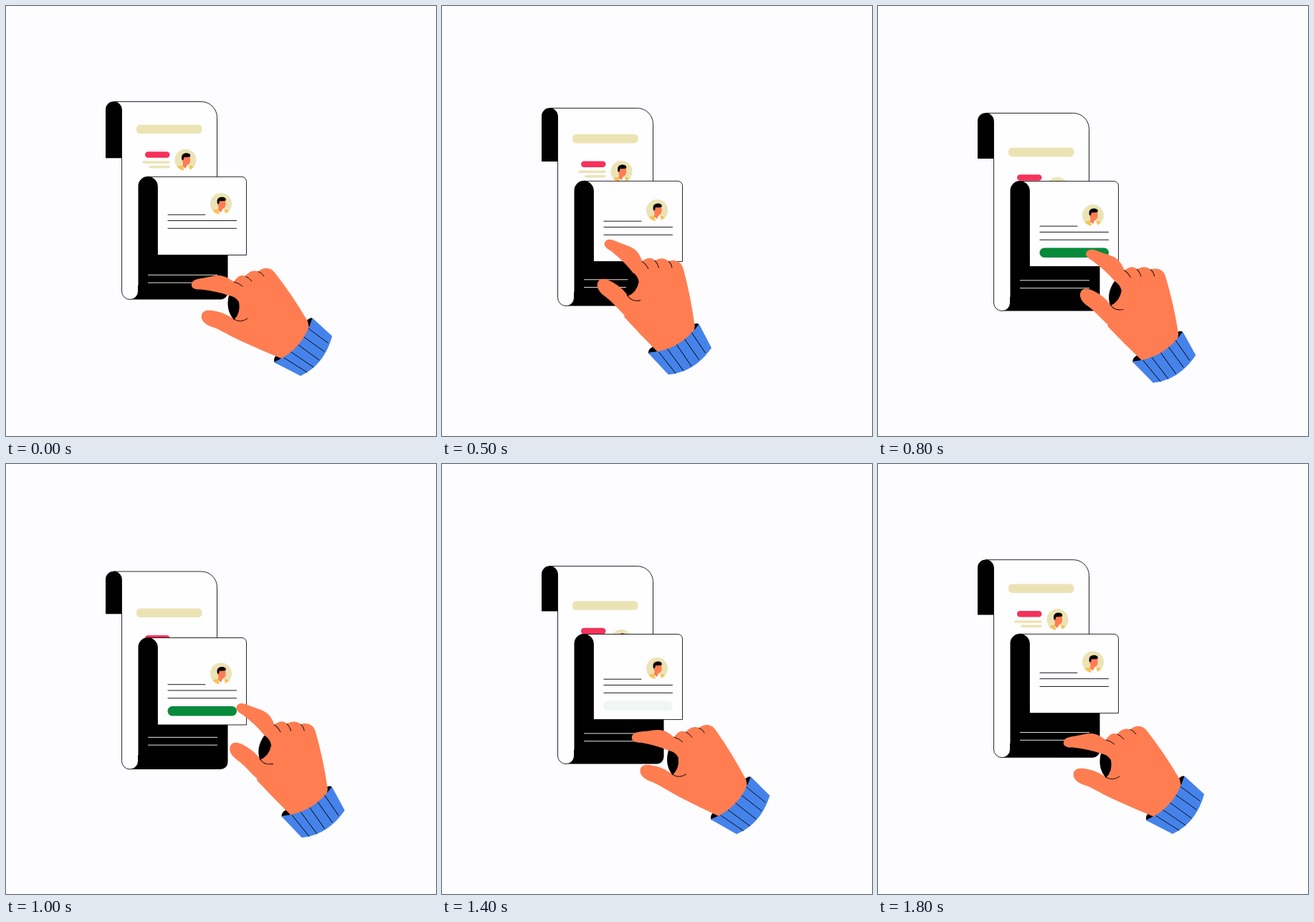
Write an HTML page that moves like this. It is 600 px wide and 600 px high and loops after 1900 ms.

```html
<!DOCTYPE html>
<html lang="en">
<head>
<meta charset="utf-8">
<title>Checkout receipt</title>
<style>
  html, body { margin: 0; width: 100%; height: 100%; overflow: hidden; background: #fdfcfe; }
  svg { display: block; width: 100vw; height: 100vh; }
  .paper { fill: #fefdff; stroke: #000; stroke-width: .85; }
  .line { fill: none; stroke: #000; stroke-width: .9; stroke-linecap: round; }
  .beige { fill: #ece3b5; }
  .skin { fill: #ff7d51; }
  .cuff { fill: #4583ea; stroke: #4583ea; stroke-width: 2; stroke-linejoin: round; }
</style>
</head>
<body>
<svg viewBox="0 0 600 600">
  <defs>
    <g id="avatar">
      <circle class="beige" r="15"/>
      <path fill="#fefdff" d="M-4 7L0 9 4 7 7 13Q2 16-4 14.5z"/>
      <path fill="#f6c552" d="M-11.5 9.5Q-8 7-4 8L-2 14.800A15 15 0 0 1-11.5 9.500zM11 10Q8 7 4.500 8L6 13.500A15 15 0 0 0 11 10z"/>
      <path class="skin" d="M-4-5H6Q8 4 4 6L2 7.500 0 12-4 9-3.500 4-5 0z"/>
      <path d="M-5 0C-6.500-6-4-9.500 1-9.500S7.500-7 6.500-4.500Q2-3.500-2-4L-3 0z"/>
    </g>
  </defs>

  <g id="back">
    <path class="paper" d="M150 133.5H272.5a22 22 0 0 1 22 22V390H184.5V398a11.5 11.5 0 0 1-23 0V145a11.5 11.5 0 0 0-11.5-11.5z"/>
  </g>
  <path id="curl"/>
  <g id="list">
    <rect class="beige" x="182" y="165.5" width="91.500" height="12.5" rx="5"/>
    <rect fill="#f6325a" x="194" y="203" width="34.500" height="8.5" rx="4.2"/>
    <path stroke="#ece3b5" stroke-width="3.5" stroke-linecap="round" d="M192 217.800H227M201 224.200H227"/>
  </g>
  <use id="buyer" href="#avatar"/>

  <path id="body"/>
  <path id="card" class="paper"/>
  <path id="notes" stroke="#e8e6dc" d="M198 375.5H295M198 386.300H295"/>
  <g id="entry">
    <use href="#avatar" x="300" y="276"/>
    <path class="line" d="M226 291.200H278M226 299.500H321.500M226 310.300H321.500"/>
    <rect id="button" fill="#088a3b" x="225.5" y="321.500" width="96.500" height="13.5" rx="6.5"/>
  </g>

  <g id="hand">
    <g id="sleeve">
      <path d="M375 498C371 488 381 486 398 465S423 432 428 436L420 470z"/>
    </g>
    <g id="thumb">
      <path class="skin" d="M318 437C311 432 303 428 293 426S275 424 273 431 278 445 288 448 310 459 325 466L345 474 340 450z"/>
    </g>
    <g id="index">
      <path class="skin" d="M326 388L318 385C313 382 309 378 301 376.5S286 378 276 379.500 260 382 259 388 264 396 272 395.500Q295 398 311 404L326 408z"/>
    </g>
    <path class="skin" d="M311 404L318 385Q325 373 334 377 342 367 352 370.500C359 364 369 364 375 372Q400 404 421 440L424 454 398 488 387 493Q355 480 325 466L318 437Q307 422 311 404z"/>
    <path d="M311 404Q306 424 318 438 328 428 325 413 320 405 311 404z"/>
    <path class="line" d="M318 437Q327 443 337 436M318 385Q324 386 330 391M334 377Q339 379 343 384M352 370.500Q357 372 360 377"/>
    <g id="cuff">
      <path class="cuff" d="M428 437Q415 480 376 497L411 515Q443 500 454 461z"/>
      <path class="line" d="M422 450L449 470M416 462L444 482M408 473L437 494M398 483L429 504M388 491L420 511"/>
    </g>
  </g>
</svg>
<script>
const LOOP = 1900, STEP = 100;
const $ = id => document.getElementById(id);
const draw = (id, d) => $(id).setAttribute('d', d);
const place = (id, transform) => $(id).setAttribute('transform', transform);
const slide = (id, y, x = 0) => place(id, `translate(${x} ${y})`);
const turn = (id, angle, x, y) => place(id, `rotate(${angle} ${x} ${y})`);

// Eased 0 to 1 between two times.
function ease(t, from, to) {
  const u = Math.min(1, Math.max(0, (t - from) / (to - from)));
  return u ** 3 * (u * (6 * u - 15) + 10);
}
// Eased there and back once per loop.
function swell(t, delay = 0) {
  const u = (t - delay + LOOP) % LOOP;
  return ease(Math.min(u, LOOP - u), 0, LOOP / 2);
}
const wave = (t, peak) => Math.cos((t - peak) / LOOP * 2 * Math.PI);

function drawPapers(t) {
  const dy = 16.5 * swell(t), scroll = swell(t, 90);
  const top = 240.7 + 4.2 * wave(t, 660), end = 211.3 + 5.8 * wave(t, 420);
  slide('back', dy);
  slide('entry', dy);
  slide('list', 36 * scroll);
  slide('buyer', 214.5 + 44 * scroll, 250.5);
  slide('notes', 3.1 + 4.4 * wave(t, 730));
  $('button').setAttribute('opacity', ease(t, 500, 800) - ease(t, 1200, 1450));
  draw('curl', `M139 ${end}V${144.5 + dy}a11.2 11.2 0 0 1 22.4 0V${end}z`);
  draw('body', `M184.5 ${top + 13}V${398 + dy}a11.5 11.5 0 0 1-11.5 11.5H299.5a10 10 0 0 0 10-10V${340 + dy}H211.5V${top + 13}a13.5 13.5 0 0 0-27 0z`);
  draw('card', `M198 ${top}H329a6.5 6.5 0 0 1 6.5 6.5V${347.5 + dy}H211.5V${top + 13.5}a13.5 13.5 0 0 0-13.5-13.5z`);
}

function drawHand(t) {
  const press = ease(t, 500, 800) - ease(t, 800, 1200);
  const point = ease(t, 0, 300) - ease(t, 1200, 1470) - .06 * press;
  const x = 14.5 * point - 97 * (ease(t, 0, 300) - ease(t, 500, 990));
  const y = 5 * point + 9 * press - 2.5 * (ease(t, 0, 300) - ease(t, 500, 800));
  place('hand', `translate(${x} ${y}) rotate(${22.8 * point} 417 477.5)`);
  turn('index', 9 * point, 318, 391);
  turn('thumb', -5 * point, 312, 437);
  for (const id of ['sleeve', 'cuff']) turn(id, -3.2 * point, 417, 477.5);
}

function tick() {
  const t = Math.floor(performance.now() % LOOP / STEP) * STEP;
  drawPapers(t);
  drawHand(t);
  requestAnimationFrame(tick);
}
tick();
</script>
</body>
</html>
```
